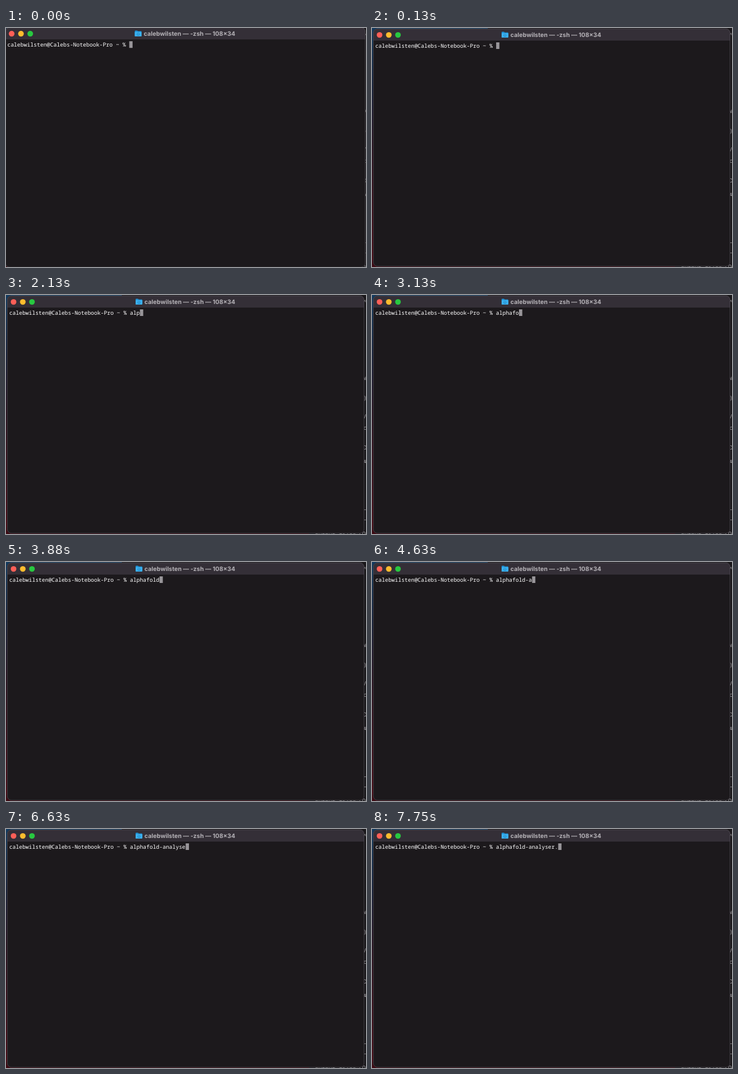
An HTML page for the animation above (8 s loop, 600 px wide and 399 px high).

```html
<!DOCTYPE html>
<html lang="en">
<head>
<meta charset="utf-8">
<title>Terminal typing</title>
<style>
  html, body { margin: 0; width: 100%; height: 100%; overflow: hidden; background: #19171a; }
  svg { display: block; width: 600px; height: 399px; }
  text { text-rendering: geometricPrecision; white-space: pre; }
  .mono { font: 500 9.077px "Noto Sans Mono", monospace; fill: #fff; }
  .title { font: 700 10px Inter, sans-serif; fill: #b5b2b7; }
  .behind { font: 9.5px "Noto Sans Mono", monospace; fill: #a3a1a4; }
</style>
</head>
<body>
<svg viewBox="0 0 600 399">
  <defs>
    <linearGradient id="desk" x2="0" y2="1">
      <stop offset="0" stop-color="#123a5e"/>
      <stop offset=".25" stop-color="#141e36"/>
      <stop offset=".5" stop-color="#260f1c"/>
      <stop offset="1" stop-color="#480812"/>
    </linearGradient>
    <clipPath id="frame"><rect x="2" y="1" width="595" height="397" rx="7"/></clipPath>
  </defs>

  <!-- desktop and the window behind -->
  <rect width="600" height="399" fill="#19171a"/>
  <rect width="193" height="20" fill="#124670"/>
  <rect width="8" height="399" fill="url(#desk)"/>
  <rect y="388" width="505" height="11" fill="#3c0a13"/>
  <g id="scraps" class="behind"></g>
  <text class="behind" x="515" y="403">output files</text>
  <text class="behind" x="588" y="402">LO</text>

  <g id="window">
    <g clip-path="url(#frame)">
      <rect x="2" y="1" width="595" height="397" fill="#1c191c"/>
      <rect x="2" y="1" width="595" height="20" fill="#342f37"/>
    </g>
    <rect x="2.3" y="1.3" width="594.4" height="396.5" rx="7" fill="none" stroke="#514d53" stroke-width=".7"/>
    <circle cx="12.6" cy="11.6" r="4.7" fill="#ff5f57"/>
    <circle cx="28" cy="11.6" r="4.7" fill="#febc2e"/>
    <circle cx="43.3" cy="11.6" r="4.7" fill="#28c840"/>
    <path d="M216 7.2q0-1 1-1h3l1.2 1.2h5q1 0 1 1v6.6q0 1-1 1h-9.2q-1 0-1-1z" fill="#1c8fd3"/>
    <rect x="216" y="8.4" width="11.2" height="7.6" rx=".9" fill="#3bb1f0"/>
    <path d="M219.3 12l2.3-2.1 2.3 2.1M220.1 11.7v2.4h3v-2.4" fill="none" stroke="#1878b4" stroke-width=".7"/>
    <text class="title" x="230.8" y="15.1">calebwilsten — -zsh — 108×34</text>
    <rect id="cursor" y="24" width="5.45" height="11" fill="#989599"/>
    <text id="line" class="mono" x="5.4" y="32.7"></text>
  </g>
</svg>
<script>
  const LOOP = 8000, SETTLE = 130, LEFT = 5.4, CELL = 5.446;
  const prompt = "calebwilsten@Calebs-Notebook-Pro ~ % ";
  const command = "alphafold-analyser.";
  // moment at which each character of the command appears
  const keyTimes = [1750, 1880, 2130, 2380, 2750, 3130, 3130, 3500, 3880, 4380,
                    4630, 4750, 5000, 5250, 6130, 6380, 6630, 7000, 7750];
  const byId = id => document.getElementById(id);

  // letters of the rear window peeking out at the right edge
  const scraps = [["^", 15], ["V", 142], [")", 175], ["/", 206], ["c", 225],
                  ["D", 258], ["A", 282], ["-", 361], ["-", 378]];
  byId("scraps").innerHTML = scraps
    .map(([letter, y]) => `<text x="595.6" y="${y}">${letter}</text>`).join("");

  function draw(time) {
    const typed = keyTimes.filter(t => t <= time).length;
    const text = prompt + command.slice(0, typed);
    byId("line").textContent = text;
    byId("cursor").setAttribute("x", LEFT + text.length * CELL);
    byId("window").setAttribute("transform",
      time < SETTLE ? "translate(-3.3 -2.1) scale(1.009)" : "");
  }

  const start = performance.now();
  function tick() {
    draw((performance.now() - start) % LOOP);
    requestAnimationFrame(tick);
  }
  tick();
</script>
</body>
</html>
```
